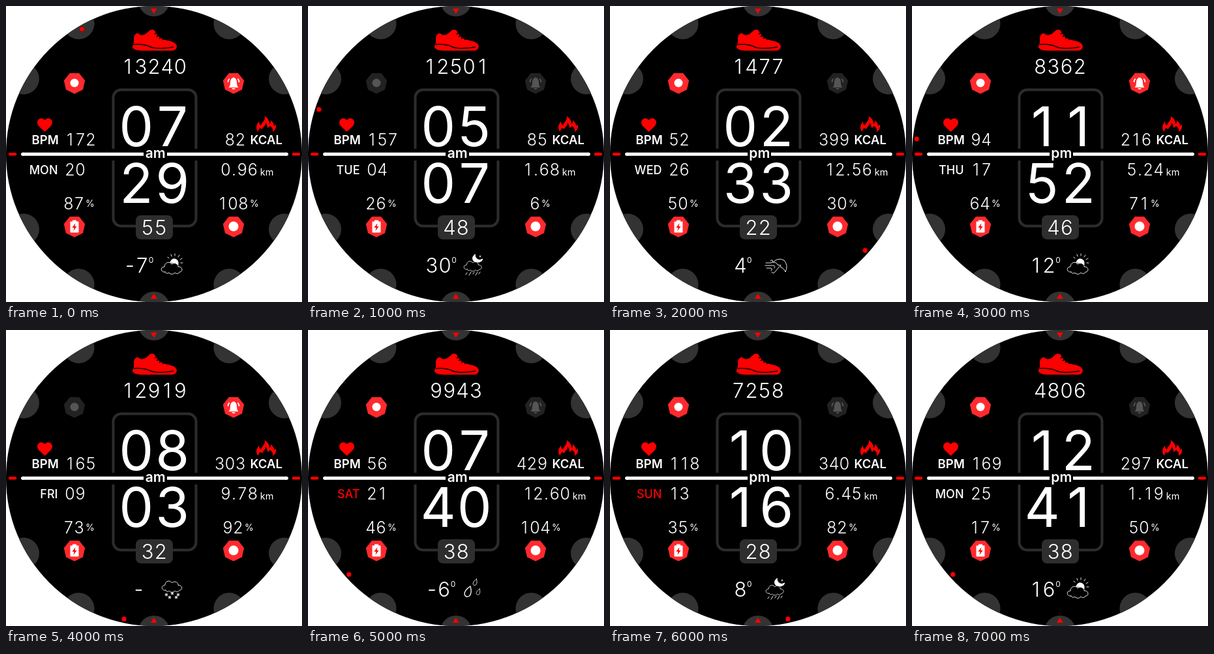
Animation of 454x454 px, one loop 8000 ms. Source, as an HTML page:

```html
<!DOCTYPE html>
<html lang="en">
<head>
<meta charset="utf-8">
<title>Watch face</title>
<style>
  html, body { margin: 0; width: 100%; height: 100%; overflow: hidden; background: #fff; }
  svg { display: block; width: 454px; height: 454px; }
  text { font-family: Inter, sans-serif; font-weight: 300; font-size: 25px; fill: #fff; }
  .digits { text-anchor: middle; }
  .large { font-size: 31px; }
  .huge { font-size: 84px; font-weight: 400; font-optical-sizing: none; }
  .label { font-size: 18.5px; font-weight: 600; }
  .half { font-size: 21px; font-weight: 600; text-anchor: middle; }
  .day { font-size: 18px; font-weight: 500; text-anchor: end; }
  .unit { font-weight: 400; text-anchor: start; }
  .red { fill: #f00; }
  .badge { fill: #ff2a2e; stroke: #ff2a2e; stroke-width: 2; stroke-linejoin: round; }
  .off .badge { fill: #222; stroke: #222; }
  .off .icon { fill: #555; }
  .icon { fill: #fff; }
  .line { fill: none; stroke: #fff; stroke-width: .9; stroke-linecap: round; stroke-linejoin: round; }
</style>
</head>
<body>
<svg viewBox="0 0 454 454">
  <defs>
    <clipPath id="face"><circle cx="227" cy="227" r="227" shape-rendering="crispEdges"/></clipPath>
    <path id="cloud" d="M6 20C-1 21-2 12 5 12C5 5 13 3 16 8C21 4 27 8 26 12C33 11 34 20 28 20C27 23 23 23 21 21C18 24 14 24 12 21C9 23 7 22 6 20Z"/>
  </defs>
  <g clip-path="url(#face)">
    <rect width="454" height="454"/>
    <g id="rim" fill="#333"></g>
    <path class="red" d="M222 4h9.5l-4.7 8zM222 449h9.5l-4.7-8z"/>

    <rect x="164.5" y="128.5" width="127" height="209" rx="12" fill="none" stroke="#2c2c2c" stroke-width="4"/>
    <path d="M160 219h136v18h-136z"/>
    <rect x="199" y="321" width="57" height="37" rx="8" fill="#2e2e2e"/>
    <path d="M25.5 227.2H211M247 227.2H430.5" stroke="#fff" stroke-width="5"/>
    <path d="M25.5 227.2h1M429.5 227.2h1" stroke="#fff" stroke-width="5" stroke-linecap="round"/>
    <path d="M6 227.2h8M441 227.2h8" stroke="#f00" stroke-width="4.5" stroke-linecap="round"/>

    <path class="red" d="M197 45Q200 41 203 42Q207 47 214 43L221 37Q226 35 228 38L233 46Q238 51 248 53Q260 55 262 61Q262 67 256 68.500H207Q196 68 193.500 63Q197 57 196 49Z"/>
    <path d="M196 59Q212 58 221 62.500T257 63M228 43l4-2M231 47l4-2.500M235 50l4-2.500M240 52l3-2" fill="none" stroke="#000" stroke-width="1.5"/>
    <path class="red" d="M59.500 193L50 184C44 176 53 168 59.500 175C66 168 75 176 69 184Z"/>
    <path class="red" d="M387 193C382 188 384 182 388 177Q388 182 391 183C393 177 398 176 397 169C403 173 404 177 404 181Q407 179 406 175C411 180 411 181 411 184L414 182Q415 190 409 193Q410 187 405 184Q403 187 401 187Q401 182 398 179C398 185 394 185 393 189L390 187Q387 189 387 193Z"/>

    <g id="link"><path class="badge"/><circle class="icon" cx="105" cy="118" r="6.500"/></g>
    <g id="alarm"><path class="badge"/><path class="icon" d="M341.500 125Q344 123 344 117Q344 111 349 109.500Q354 111 354 117Q354 123 356.500 125ZM346 126h6q-3 4-6 0z"/>
      <path class="icon" d="M342 111l1.300 1q-2 2-2 5h-1.600q0-4 2.300-6zM356 111l-1.300 1q2 2 2 5h1.600q0-4-2.300-6z"/></g>
    <g><path class="badge"/><path class="icon" d="M102 328.500h6v2h2.500q1 0 1 1v15q0 1-1 1h-11q-1 0-1-1v-15q0-1 1-1h2.500z"/>
      <path class="red" d="M106.500 333l-5 7h3l-1 5 5-7h-3z"/></g>
    <g><path class="badge"/><circle class="icon" cx="349" cy="338" r="7.500"/></g>

    <g id="numbers"></g>
    <text id="half" class="half" x="229.300" y="233"/>
    <text id="day" class="day" x="79.500" y="258"/>
    <text class="label" x="39.500" y="212">BPM</text>
    <text class="label" x="374.500" y="212">KCAL</text>
    <g id="weather" class="line" transform="translate(238 380)"></g>
    <circle id="dot" class="red" r="3.600" stroke="#900" stroke-width="1"/>
  </g>
</svg>
<script>
const $ = id => document.getElementById(id);
const TAU = 2 * Math.PI;

const cloud = (x, y, s) => `<use href="#cloud" transform="translate(${x} ${y}) scale(${s})"/>`;
const drop = (x, y, s) =>
  `<path transform="translate(${x} ${y}) scale(${s})" d="M6 0Q8 7 5 10Q1 12 0 8Q0 4 6 0Z"/>`;
const flake = (x, y) => `<path d="M${x - 2} ${y}h4m-2-2v4m-1.500-3.500l3 3m0-3l-3 3"/>`;
const weather = {
  sun: cloud(0, 8, 1) + '<path fill="#fff" d="M14 13Q16 7 21 8Q27 9 26 17Q22 13 17 14Z"/><path d="M12 7l-2-2M16 4l-1-3M21 3v-3M26 5l2-3M29 9l3-2M30 14h3"/>',
  night: cloud(1, 7, .85) + '<path fill="#fff" d="M18 1Q12 6 16 11Q20 13 24 13Q29 12 30 8Q25 11 21 8Q18 5 18 1Z"/><path d="M25 4h2m-1-1v2M6 29l-2 3M12 28l-3 5M17 28l-2 3M22 28l-3 5M26 28l-2 3"/>',
  wind: '<path d="M12 13Q20 5 29 10Q36 18 31 28Q29 22 24 21Q24 17 19 17Q18 13 12 13ZM24 17L14 29q-3 2-4-1M1 14h8q4-1 2-4q-2-1-3 1M0 18h13q3 1 1 4M2 22h7q3 2 0 4"/>',
  snow: cloud(1, 0, .96) + flake(8, 26) + flake(17, 24) + flake(26, 26) + flake(13, 30) + flake(23, 30),
  rain: drop(15, 2, .9) + drop(2, 13, 1.5) + drop(20, 17, .85)
};

// align: 0 starts at x, .5 centres on it, 1 ends at it
const small = { pitch: 16, style: "" };
const large = { pitch: 20.2, style: "large" };
const huge = { pitch: 55.5, style: "huge" };
const percent = { text: "%", size: 14, rise: 4, gap: 2, width: 12 };
const numbers = {
  steps: { ...large, x: 227, y: 103.5, align: .5 },
  hour: { ...huge, x: 227.5, y: 215, align: .5 },
  minute: { ...huge, x: 227.5, y: 302, align: .5 },
  second: { ...large, x: 227.2, y: 350.5, align: .5 },
  bpm: { ...small, x: 90, y: 214, align: 0 },
  kcal: { ...small, x: 367.5, y: 214, align: 1 },
  date: { ...small, x: 90, y: 260, align: 0 },
  km: { ...small, x: 329, y: 260, align: 0, unit: { text: "km", size: 14.5, rise: 0, gap: 3.5, width: 22 } },
  battery: { ...small, x: 111, y: 312, align: .5, unit: percent },
  goal: { ...small, x: 355, y: 312, align: .5, unit: percent },
  temp: { ...large, x: 203.5, y: 408.5, align: .5, unit: { text: "0", size: 12, rise: 15, gap: 0, width: 7 } }
};

const fields = ["steps", "hour", "minute", "half", "second", "bpm", "kcal", "day", "date", "km", "battery", "goal", "temp"];
const states = [
  "13240 07 29 am 55 172 82 MON 20 0.96 87 108 -7 sun link alarm",
  "12501 05 07 am 48 157 85 TUE 04 1.68 26 6 30 night",
  "1477 02 33 pm 22 52 399 WED 26 12.56 50 30 4 wind link",
  "8362 11 52 pm 46 94 216 THU 17 5.24 64 71 12 sun link alarm",
  "12919 08 03 am 32 165 303 FRI 09 9.78 73 92 - snow alarm",
  "9943 07 40 am 38 56 429 SAT 21 12.60 46 104 -6 rain link",
  "7258 10 16 pm 28 118 340 SUN 13 6.45 35 82 8 night link",
  "4806 12 41 pm 38 169 297 MON 25 1.19 17 50 16 sun link"
].map(s => s.split(" "));

// Rim tabs at every hour except three and nine; top and bottom sit further out
for (let h = 0; h < 12; h++) if (h % 6 !== 3)
  $("rim").innerHTML += `<circle cx="227" cy="${h % 6 ? -4 : -8}" r="24" transform="rotate(${h * 30} 227 227)"/>`;

const heptagon = (x, y) => "M" + Array.from({ length: 7 }, (_, i) =>
  [x + 15.5 * Math.sin(i * TAU / 7), y + 15.5 * Math.cos(i * TAU / 7)].map(v => v.toFixed(2))).join("L") + "Z";
document.querySelectorAll(".badge").forEach((b, i) =>
  b.setAttribute("d", heptagon(i % 2 ? 349 : 105, i < 2 ? 118 : 338)));

// Each digit is centred in a cell of equal width
function number(value, { x, y, align, pitch, style, unit }) {
  const shown = value === "-" ? null : unit;
  const widths = [...value].map(c => pitch * ({ ".": .58, "-": .85 }[c] || 1));
  const total = widths.reduce((a, b) => a + b) + (shown ? shown.gap + shown.width : 0);
  let left = x - align * total;
  const centres = widths.map(w => (left += w) - w / 2);
  const tail = shown
    ? `<text class="unit" x="${left + shown.gap}" y="${y - shown.rise}" style="font-size:${shown.size}px">${shown.text}</text>` : "";
  return `<text class="digits ${style}" x="${centres.join(" ")}" y="${y}">${value}</text>` + tail;
}

function show(state) {
  const values = Object.fromEntries(fields.map((name, i) => [name, state[i]]));
  const [kind, ...active] = state.slice(fields.length);
  $("numbers").innerHTML = Object.keys(numbers).map(name => number(values[name], numbers[name])).join("");
  $("half").textContent = values.half;
  $("day").textContent = values.day;
  $("day").classList.toggle("red", /SAT|SUN/.test(values.day));
  $("weather").innerHTML = weather[kind];
  for (const id of ["link", "alarm"]) $(id).classList.toggle("off", !active.includes(id));
  const angle = values.second / 60 * TAU;
  $("dot").setAttribute("cx", 227 + 221 * Math.sin(angle));
  $("dot").setAttribute("cy", 227 - 221 * Math.cos(angle));
}

let current = -1;
function tick() {
  const next = Math.floor(performance.now() / 1000) % states.length;
  if (next !== current) show(states[current = next]);
  requestAnimationFrame(tick);
}
tick();
</script>
</body>
</html>
```
